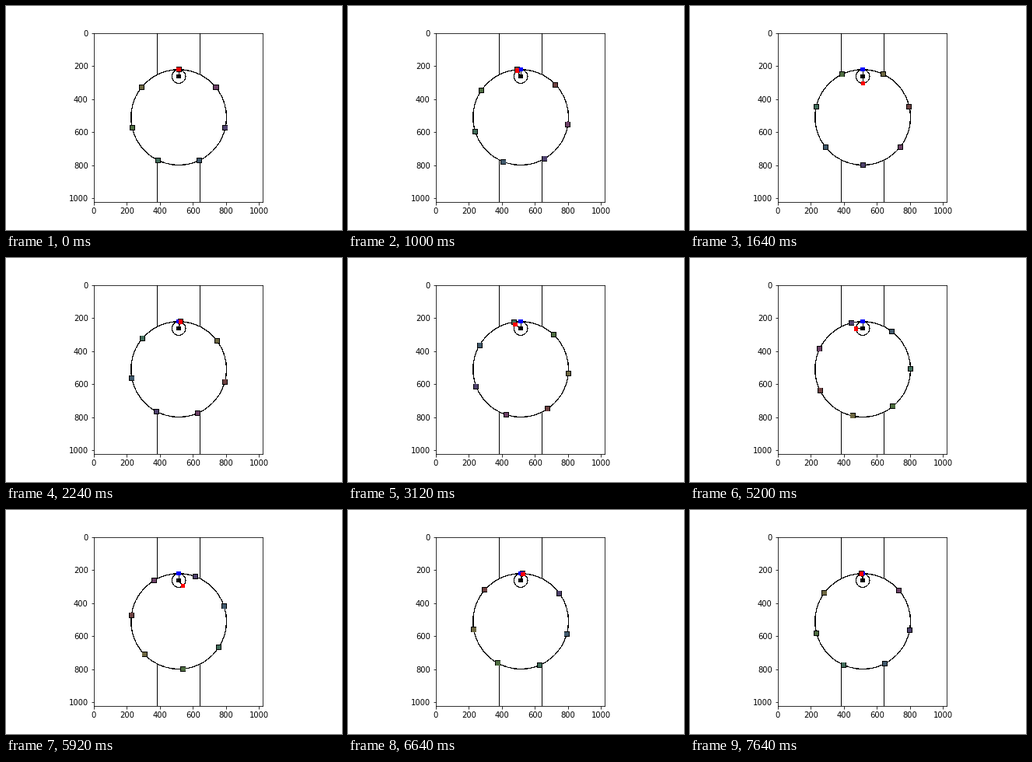
Write a matplotlib script that moves like this. It is 432x288 px and loops after 7680 ms.

```python
import colorsys

import matplotlib.pyplot as plt
import numpy as np
from matplotlib.animation import FuncAnimation

FRAMES, INTERVAL = 192, 40
SIZE, MID = 1024, 512
TEETH = 7
RING_R = 288
GEAR_R = RING_R / TEETH
GEAR_Y = MID - RING_R + GEAR_R
BLACK, RED, BLUE = (0, 0, 0), (255, 0, 0), (0, 0, 255)
TOOTH_COLORS = [
    tuple(int(255 * c) for c in colorsys.hsv_to_rgb(k / TEETH, 0.4, 0.43))
    for k in range(TEETH)
]


def box(img, x, y, half, color):
    x, y = round(x), round(y)
    img[y - half:y + half + 1, x - half:x + half + 1, :3] = color


def line(img, x0, y0, x1, y1):
    for x, y in zip(np.linspace(x0, x1, 40), np.linspace(y0, y1, 40)):
        box(img, x, y, 2, BLACK)


def circle(img, cy, r, width=6):
    y, x = np.ogrid[:SIZE, :SIZE]
    dist = np.hypot(x - MID, y - cy)
    img[dist < r] = 255
    img[abs(dist - r) <= width / 2, :3] = BLACK


def polar(cy, r, angle):
    """Point at a clockwise angle from the top of a circle."""
    return MID + r * np.sin(angle), cy - r * np.cos(angle)


def make_base():
    img = np.full((SIZE, SIZE, 4), 255, np.uint8)
    for x in (384, 640):
        img[:, x - 2:x + 3, :3] = BLACK
    circle(img, MID, RING_R)
    circle(img, GEAR_Y, GEAR_R)
    return img


base = make_base()


def render(frame):
    img = base.copy()
    turn = 2 * np.pi * frame / FRAMES
    for k, color in enumerate(TOOTH_COLORS):
        x, y = polar(MID, RING_R, turn - 2 * np.pi * k / TEETH)
        box(img, x, y, 16, BLACK)
        box(img, x, y, 12, color)

    top = polar(GEAR_Y, GEAR_R, 0)
    pin = polar(GEAR_Y, GEAR_R, TEETH * turn)
    for end in (top, pin):
        line(img, MID, GEAR_Y, *end)
    box(img, MID, GEAR_Y, 12, BLACK)
    box(img, *top, 12, BLUE)
    box(img, *pin, 12, RED)
    return img


plt.rcParams["font.family"] = "DejaVu Sans"
fig, ax = plt.subplots(figsize=(6, 4), dpi=72)
fig.subplots_adjust(left=0.125, right=0.9, bottom=0.125, top=0.88)
picture = ax.imshow(render(0), interpolation="nearest")


def update(frame):
    picture.set_data(render(frame))
    return [picture]


anim = FuncAnimation(fig, update, frames=FRAMES, interval=INTERVAL, repeat=True)
plt.show()
```
